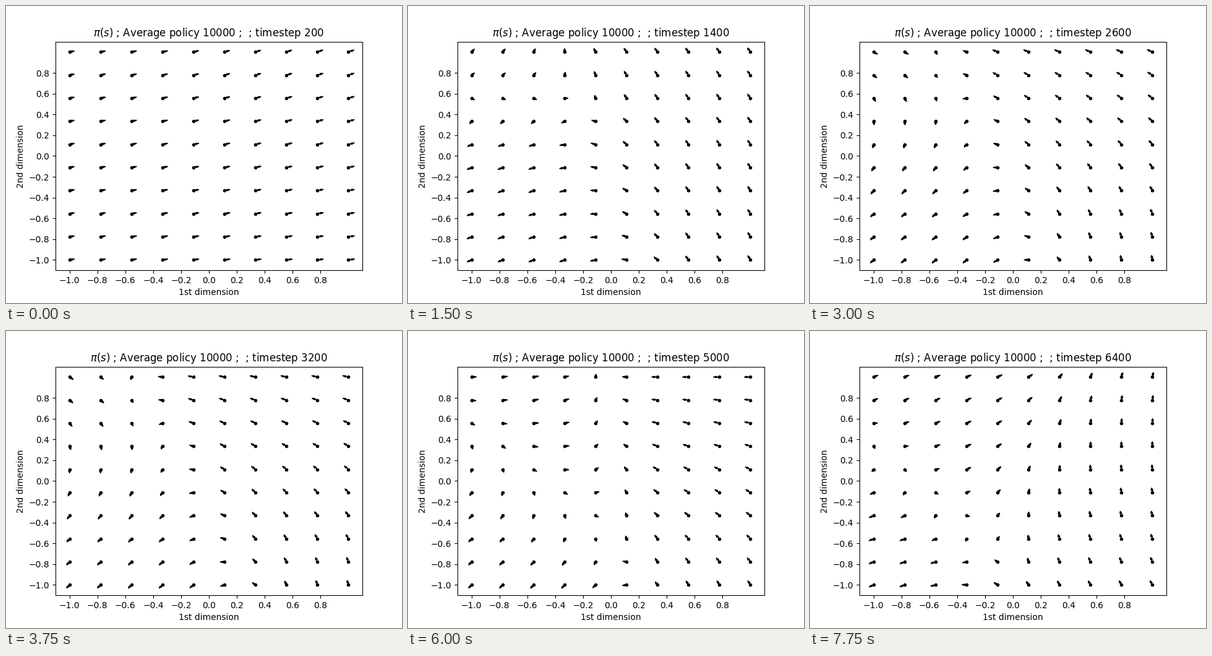
A matplotlib script that plays this animation: 640 by 480 pixels, repeating every 8000 ms.

```python
import numpy as np
import matplotlib.pyplot as plt
from matplotlib.animation import FuncAnimation

N = 10
FRAMES = 32
INTERVAL = 250
ASPECT = (496 / 2.2) / (369.6 / 2.2)   # pixels per unit, x over y

axis = np.linspace(-1, 1, N)
X, Y = np.meshgrid(axis, axis)


def step(t):
    return (1 + np.tanh(t)) / 2


def pose(left, right, front, rise):
    """Headings of a field split by two slanted fronts.

    left, right: degrees at the (bottom, top) of each side
    front: x and slope of the border between the sides
    rise: y, slope and width of the turn within the left side
    """
    x0, lean = front
    y0, tilt, width = rise
    lower, upper = left
    a = lower + (upper - lower) * step((Y - y0 - tilt * X) / width)
    b = right[0] + (right[1] - right[0]) * (Y + 1) / 2
    s = step((X - x0 - lean * Y) / 0.35)
    mix = (1 - s) * np.exp(1j * np.radians(a)) + s * np.exp(1j * np.radians(b))
    return np.angle(mix)


poses = {
    0: pose((10, 13), (8, 20), (0, 0), (0, 0, 1)),
    6: pose((205, 405), (120, 126), (-0.1, -0.25), (0.5, 0, 0.2)),
    9: pose((222, 350), (98, 143), (-0.2, -0.3), (0.45, 0, 0.55)),
    15: pose((225, 335), (105, 167), (-0.15, -0.4), (0.2, 0, 0.55)),
    19: pose((222, 350), (105, 178), (-0.08, -0.46), (0.2, 0, 0.45)),
    24: pose((228, 370), (122, 180), (0, -0.1), (-0.65, -1, 0.45)),
    31: pose((205, 382), (118, 80), (0.05, 0.3), (-0.85, -1.15, 0.25)),
}
times = sorted(poses)


def headings(i):
    """Turn each arrow the short way between neighbouring poses."""
    k = min(np.searchsorted(times, i, side="right"), len(times) - 1)
    t0, t1 = times[k - 1], times[k]
    turn = (poses[t1] - poses[t0] + np.pi) % (2 * np.pi) - np.pi
    return poses[t0] + turn * (i - t0) / (t1 - t0)


def shafts(i):
    """Shaft vectors in data units, shorter where the field turns quickly."""
    a = headings(i)
    gy, gx = np.gradient(np.exp(1j * a))
    bend = np.hypot(abs(gx), abs(gy))
    length = (0.019 + 0.004 * X) / (1 + (bend / 0.7) ** 2)
    dx, dy = np.cos(a), np.sin(a) * ASPECT
    scale = length / np.hypot(dx, dy)
    return dx * scale, dy * scale


fig, ax = plt.subplots(figsize=(6.4, 4.8), dpi=100)
ax.plot(X.ravel(), Y.ravel(), "k.")
arrows = [ax.arrow(x, y, 0.01, 0, head_width=0.015, color="k")
          for x, y in zip(X.flat, Y.flat)]
ticks = np.arange(-10, 10, 2) / 10
ax.set(xlim=(-1.1, 1.1), ylim=(-1.1, 1.1), xticks=ticks, yticks=ticks,
       xlabel="1st dimension", ylabel="2nd dimension")
title = ax.set_title("")


def draw(i):
    dx, dy = shafts(i)
    for arrow, u, v in zip(arrows, dx.flat, dy.flat):
        arrow.set_data(dx=u, dy=v)
    title.set_text(rf"$\pi(s)$ ; Average policy 10000 ;  ; timestep {200 * (i + 1)}")
    return [title, *arrows]


anim = FuncAnimation(fig, draw, frames=FRAMES, interval=INTERVAL, repeat=True)
plt.show()
```
